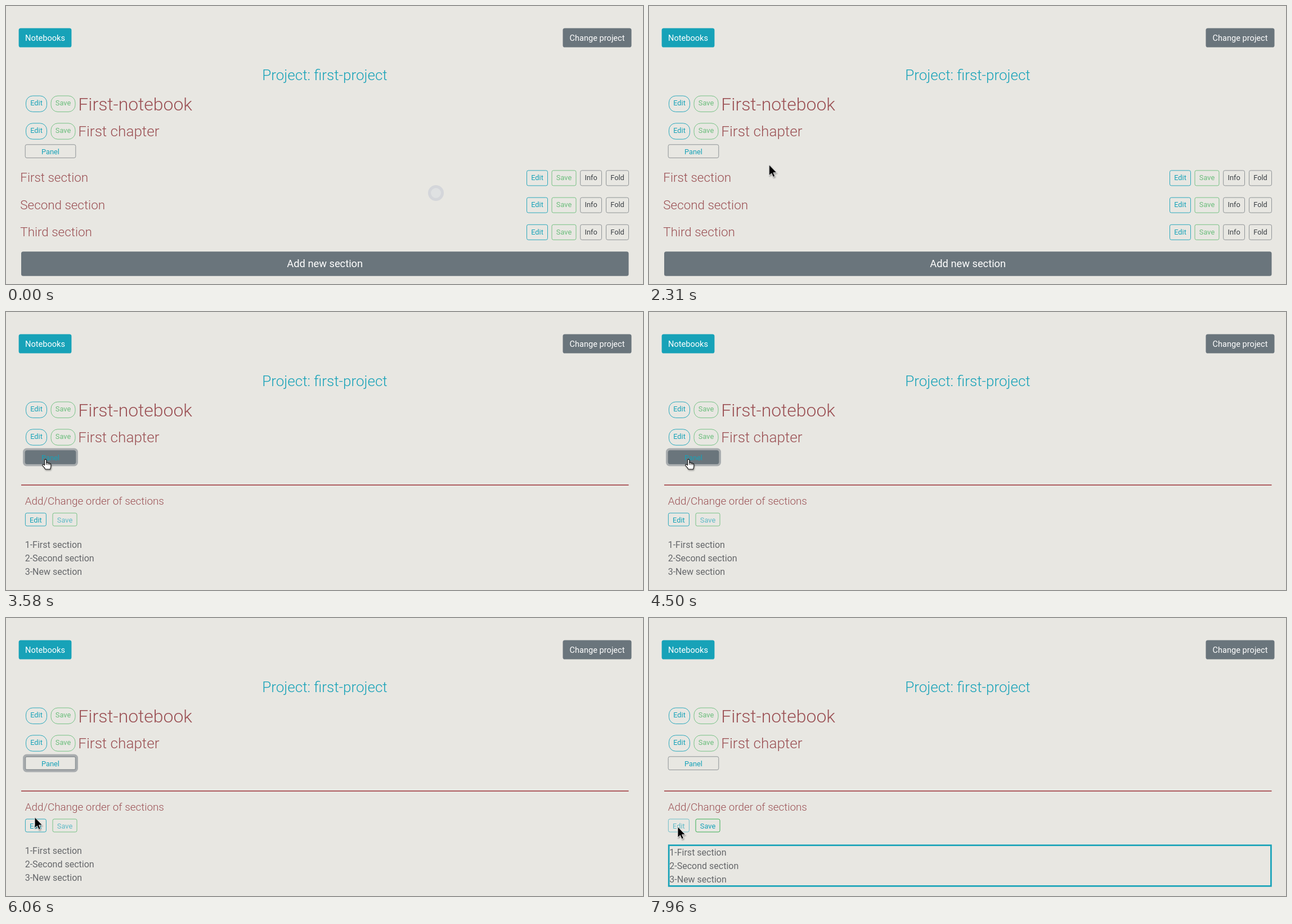
These frames come from a looping animation (1132x495 px, 8 s). An HTML page:

```html
<!DOCTYPE html>
<html lang="en">
<head>
<meta charset="utf-8">
<title>Notebook sections</title>
<style>
  html, body { margin: 0; width: 100%; height: 100%; overflow: hidden; background: #e8e7e2; }
  svg { display: block; width: 1132px; height: 495px; font-family: Roboto, sans-serif; }
  rect { stroke-width: .9px; }
  .title { font-weight: 300; fill: #9b5054; }
  .off { opacity: .65; }

  /* Every animation shares one 8 s clock: 1% = 80 ms. */
  .ripple, .before, .after, .list, .editor, .panel .fill, .panel .ring,
  .edit, .edit .fill, .edit text, .save, .cursor, .arrow, .hand {
    animation: 8s linear infinite both;
  }
  .before, .after, .list, .editor, .edit, .save, .arrow, .hand { animation-timing-function: step-end; }

  .ripple { animation-name: ripple; }
  @keyframes ripple { 0%, .7% { opacity: 1 } 2.8%, 100% { opacity: 0 } }

  .before { animation-name: before; }
  .after { animation-name: after; }
  @keyframes before { 0% { visibility: visible } 44.75%, 100% { visibility: hidden } }
  @keyframes after { 0% { opacity: 0 } 44.75%, 100% { opacity: 1 } }

  .list { animation-name: list; }
  .editor { animation-name: editor; }
  @keyframes list { 0% { opacity: 1 } 90.6%, 100% { opacity: 0 } }
  @keyframes editor { 0% { opacity: 0 } 90.6%, 100% { opacity: 1 } }

  .panel .fill { animation-name: panel-fill; }
  .panel .ring { animation-name: panel-ring; }
  @keyframes panel-fill { 0%, 30.5% { opacity: 0 } 32.4%, 65% { opacity: 1 } 66.9%, 100% { opacity: 0 } }
  @keyframes panel-ring {
    0%, 42.1% { stroke-width: 0; opacity: 0 }
    43.75%, 87.6% { stroke-width: 5.4px; opacity: 1 }
    89.5%, 100% { stroke-width: 0; opacity: 0 }
  }

  .edit { animation-name: edit; }
  .save { animation-name: save; }
  .edit .fill { animation-name: edit-fill; }
  .edit text { animation-name: edit-text; }
  @keyframes edit { 0% { opacity: 1 } 90.6%, 100% { opacity: .65 } }
  @keyframes save { 0% { opacity: .65 } 90.6%, 100% { opacity: 1 } }
  @keyframes edit-fill { 0%, 77.6% { opacity: 0 } 79.5%, 90.6% { opacity: 1 } 92.5%, 100% { opacity: 0 } }
  @keyframes edit-text { 0%, 77.6% { fill: #17a2b8 } 79.5%, 90.6% { fill: #11788a } 92.5%, 100% { fill: #17a2b8 } }

  .cursor { animation-name: cursor; filter: drop-shadow(1px 2px 1px rgba(0, 0, 0, .35)); }
  @keyframes cursor {
    0%, 18% { transform: translate(764px, 333px); animation-timing-function: ease-in-out }
    26%, 28.8% { transform: translate(222px, 282px) }
    28.875% { transform: translate(214px, 283px); animation-timing-function: ease-out }
    32.5%, 36% { transform: translate(100px, 262px); animation-timing-function: ease-in-out }
    41%, 64.1% { transform: translate(72px, 262px); animation-timing-function: ease-in-out }
    73.5%, 74.25% { transform: translate(54px, 352px) }
    75.75% { transform: translate(51px, 355px) }
    80.75%, 86.5% { transform: translate(51px, 363px) }
    88.75%, 98.1% { transform: translate(51px, 368px) }
    99.5%, 100% { transform: translate(51px, 372px) }
  }
  .arrow { animation-name: arrow; }
  .hand { animation-name: hand; }
  @keyframes arrow { 0% { opacity: 0 } 18% { opacity: 1 } 30.5% { opacity: 0 } 65%, 100% { opacity: 1 } }
  @keyframes hand { 0% { opacity: 0 } 30.5% { opacity: 1 } 65%, 100% { opacity: 0 } }
</style>
</head>
<body>
<svg id="stage" viewBox="0 0 1132 495"></svg>
<script>
const TEAL = '#17a2b8', GREEN = '#28a745', GREY = '#6a757c', DARK = '#3a3f44', BORDER = '#858b8e';

const group = (name, ...parts) => `<g class="${name}">${parts.join('')}</g>`;

const label = (text, x, y, size, attrs = '') =>
  `<text x="${x}" y="${y}" font-size="${size}" ${attrs}>${text}</text>`;

const title = (text, x, y, size) => label(text, x, y, size, 'class="title"');

const box = (x, y, w, h, r, attrs) =>
  `<rect x="${x}" y="${y}" width="${w}" height="${h}" rx="${r}" ${attrs}/>`;

const centred = (text, x, w, baseline, size, color) =>
  label(text, x + w / 2, baseline, size, `text-anchor="middle" fill="${color}"`);

const solid = (text, x, y, w, h, baseline, size, color) =>
  box(x, y, w, h, 3.6, `fill="${color}"`) + centred(text, x, w, baseline, size, '#fff');

const outline = (text, x, y, w, h, r, baseline, color, border = color) =>
  box(x, y, w, h, r, `fill="none" stroke="${border}"`) + centred(text, x, w, baseline, 12.8, color);

const heading = (text, y, baseline, size) =>
  outline('Edit', 35.5, y, 37, 28.4, 12, y + 17, TEAL) +
  group('off', outline('Save', 80, y, 43, 28.4, 12, y + 17, GREEN)) +
  title(text, 128.3, baseline, size);

const section = (text, row) => {
  const y = 292.9 + row * 48.2;
  const button = (name, x, w, color, border) => outline(name, x, y, w, 27, 2.8, y + 17.2, color, border);
  return title(text, 25.3, y + 20.4, 22.4) +
    button('Edit', 925.5, 37, TEAL) +
    group('off', button('Save', 970, 43, GREEN)) +
    button('Info', 1020.7, 37.8, DARK, BORDER) +
    button('Fold', 1066.5, 40, DARK, BORDER);
};

const lines = (x, y) => ['1-First section', '2-Second section', '3-New section']
  .map((text, i) => label(text, x, y + i * 24, 16, 'fill="#65676a"')).join('');

const panel = group('panel',
  box(32.7, 245.2, 92.6, 26.6, 4, 'class="ring" fill="none" stroke="#a9adaf"'),
  box(34.2, 246.8, 89.6, 23.6, 2.8, `fill="none" stroke="${BORDER}"`),
  box(34.2, 246.8, 89.6, 23.6, 2.8, `class="fill" fill="${GREY}" stroke="${GREY}"`),
  centred('Panel', 34, 90, 263.6, 12.8, TEAL));

const order = group('after',
  box(27, 307.2, 1079.5, 1.8, 0, 'fill="#a84f53"'),
  title('Add/Change order of sections', 33.8, 343.4, 18.85),
  group('edit',
    box(34.4, 358, 37, 23, 2.8, `fill="none" stroke="${TEAL}"`),
    box(34.4, 358, 37, 23, 2.8, `class="fill" fill="${TEAL}" stroke="${TEAL}"`),
    centred('Edit', 34.4, 37, 374.6, 12.8, TEAL)),
  group('save', outline('Save', 83, 358, 43, 23, 2.8, 374.6, TEAL, GREEN)),
  group('list', lines(33.7, 420)),
  group('editor',
    box(35.2, 404.7, 1070.2, 72.6, 0, `fill="none" stroke="${TEAL}" style="stroke-width:2.7px"`),
    lines(36.3, 422.6)));

const cursor = group('cursor',
  `<path class="arrow" d="M0 -.5V19L4.4 15 7.3 21.6 10.4 20.2 7.6 13.8H13.6Z"
    fill="#000" stroke="#fff" stroke-width=".9"/>`,
  `<path class="hand" d="M-3.4 11V2Q-3.4 .4 -1.8 .4T-.2 2V6.5Q2.2 5.6 2.8 7.2 5 6.4 5.6 8
    7.8 7.6 7.8 9.6V13Q7.8 15.2 6.4 18H-2Q-3.6 14.8 -7 11.6-7.8 9.6 -6 9.2-4.8 9.4 -3.4 11Z
    M-.2 6.5V10M2.8 7.2V10.4M5.6 8V10.6"
    fill="#fff" stroke="#111" stroke-width="1.1" stroke-linejoin="round"/>`);

document.getElementById('stage').innerHTML = [
  solid('Notebooks', 22.6, 39.5, 93.8, 34, 61.8, 14.6, TEAL),
  solid('Change project', 989.5, 39.5, 122, 34, 61.8, 14.6, GREY),
  label('Project: first-project', 566.5, 131.5, 26, `text-anchor="middle" font-weight="300" fill="${TEAL}"`),
  heading('First-notebook', 160, 185.8, 31.9),
  heading('First chapter', 208.8, 231.8, 26.1),
  panel,
  group('before',
    ['First section', 'Second section', 'Third section'].map(section).join(''),
    solid('Add new section', 27, 437.2, 1079.5, 43.6, 465, 18.3, GREY)),
  order,
  '<circle class="ripple" cx="764" cy="333" r="11.5" fill="#dfe1e2" stroke="#d4d6da" stroke-width="5"/>',
  cursor
].join('');
</script>
</body>
</html>
```
